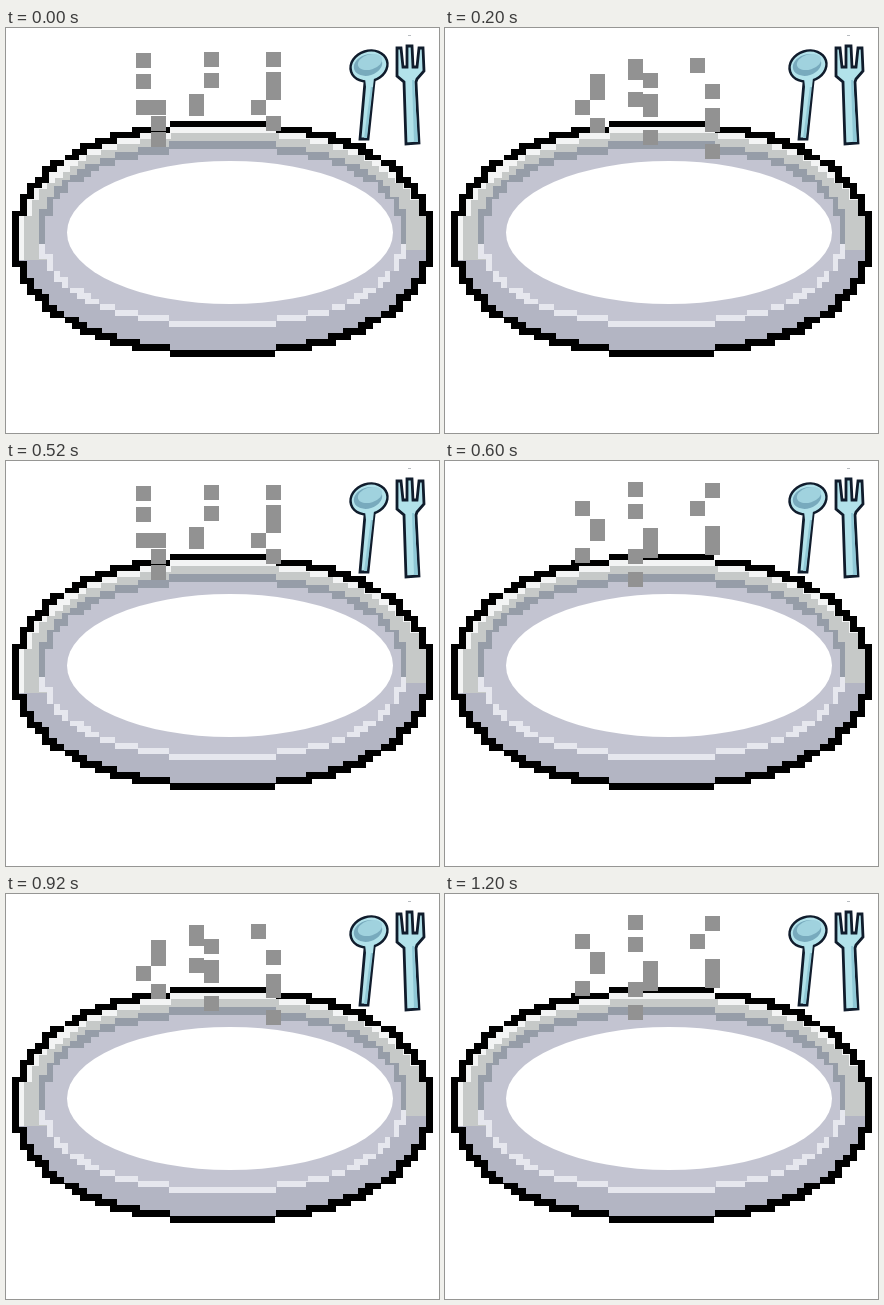
Animation of 433 by 405 pixels, one loop 1400 ms. Source, as an HTML page with a canvas:

```html
<!DOCTYPE html>
<html lang="en">
<head>
<meta charset="utf-8">
<title>Steaming plate</title>
<style>
html, body { margin: 0; width: 100%; height: 100%; overflow: hidden; background: #fff; }
canvas { display: block; }
</style>
</head>
<body>
<canvas id="stage" width="433" height="405"></canvas>
<script>
const stage = document.getElementById('stage');
const ctx = stage.getContext('2d');
const STEP = 200;
const ORDER = [0, 1, 0, 2, 1, 0, 2];
const PUFF = 15;
const WISPS = [130, 183, 245];

// Puff tops per pose and wisp; a minus sign puts the puff on the left side
const POSES = [
  [[-25, -46, -72, 72, 88, 104], [24, 45, -66, -73], [24, 44, 57, -72, 88]],
  [[46, 57, -72, 90], [-31, -37, 45, -64, 66, 74, 102], [-30, 56, 80, 89, 116]],
  [[-40, 58, 65, -87], [-21, -43, 67, 82, -88, -111], [22, -40, 65, 79]]
];

function rect(color, x, y, w, h) {
  ctx.fillStyle = color;
  ctx.fillRect(x, y, w, h);
}

// Superellipse of the given power made of stepped rows between from and to
function steps(color, left, right, top, bottom, power, from = 0, to = 405) {
  const cx = (left + right) / 2, rx = (right - left) / 2, ry = (bottom - top) / 2;
  const rows = Math.round(ry * 2 / 5.6), h = ry * 2 / rows;
  const cell = rx / Math.round(rx / 7.6);
  for (let i = 0; i < rows; i++) {
    const v = Math.abs((i + 0.5) * 2 / rows - 1);
    const half = Math.round(rx * (1 - v ** power) ** (1 / power) / cell) * cell;
    const y0 = Math.max(from, Math.round(top + i * h));
    const y1 = Math.min(to, Math.round(top + (i + 1) * h));
    if (y1 > y0) rect(color, Math.round(cx - half), y0, Math.round(half * 2), y1 - y0);
  }
}

function oval(color, x, y, rx, ry, tilt = 0) {
  ctx.fillStyle = color;
  ctx.beginPath();
  ctx.ellipse(x, y, rx, ry, tilt, 0, Math.PI * 2);
  ctx.fill();
}

function shape(d, fill, line) {
  const path = new Path2D(d);
  ctx.fillStyle = fill;
  ctx.fill(path);
  if (line) {
    ctx.strokeStyle = line;
    ctx.lineWidth = 2.8;
    ctx.stroke(path);
  }
}

function plate() {
  steps('#000', 6, 427, 93, 329, 2.2);
  steps('#b3b5c3', 13, 420, 99, 322, 2.1);
  // The upper rim catches the light and ends lower on the left
  ctx.save();
  ctx.beginPath();
  ctx.rect(0, 0, 217, 232);
  ctx.rect(217, 0, 216, 222);
  ctx.clip();
  steps('#f3f4f4', 13, 420, 99, 322, 2.1);
  steps('#c6c9c8', 18, 420, 105, 322, 2.15);
  ctx.restore();
  steps('#969da8', 33, 400, 113, 299, 2.2, 0, 216);
  steps('#e6e7ee', 33, 400, 113, 299, 2.2, 216);
  steps('#c3c4d1', 39, 395, 121, 293, 2.2);
  oval('#fff', 224, 204.5, 163, 71.5);
}

function cutlery() {
  const ink = '#101c2c', pale = '#b2e2ea', mid = '#8fc8d6', deep = '#78aabd';
  // Spoon
  shape('M359 54 L368 54 L362 111 L354 111 Z', pale, ink);
  shape('M365 58 L367 58 L361 110 L358 110 Z', mid);
  oval(ink, 363, 38, 20, 16.5, -0.3);
  oval(pale, 363, 38, 17.5, 14, -0.3);
  oval(deep, 362, 37, 14.5, 10.5, -0.3);
  oval('#a0d2de', 364, 34, 12.5, 7.5, -0.3);
  shape('M359 50 L368 50 L367 59 L360 59 Z', pale);
  // Fork
  shape('M391 20 L395 20 L397 39 L401 39 L401 18 L406 18 L407 39 L411 39 ' +
        'L413 20 L417 20 L418 43 L411 51 L410 54 L413 115 L400 116 L398 54 L391 48 Z',
        pale, ink);
  shape('M406 52 L408 52 L412 114 L408 114 Z', mid);
  rect('#b8bcc0', 402, 7, 3, 1);
}

function steam(pose) {
  POSES[pose].forEach((tops, i) => {
    for (const top of tops) {
      const side = top > 0 ? PUFF : 0;
      rect('#929292', WISPS[i] + side, Math.abs(top), PUFF, PUFF);
    }
  });
}

function draw(pose) {
  rect('#fff', 0, 0, 433, 405);
  plate();
  cutlery();
  steam(pose);
}

let shown = -1;
const start = performance.now();
function tick(now) {
  const slot = Math.floor(Math.max(0, now - start) / STEP) % ORDER.length;
  const pose = ORDER[slot];
  if (pose !== shown) {
    shown = pose;
    draw(pose);
  }
  requestAnimationFrame(tick);
}
tick(start);
</script>
</body>
</html>
```
